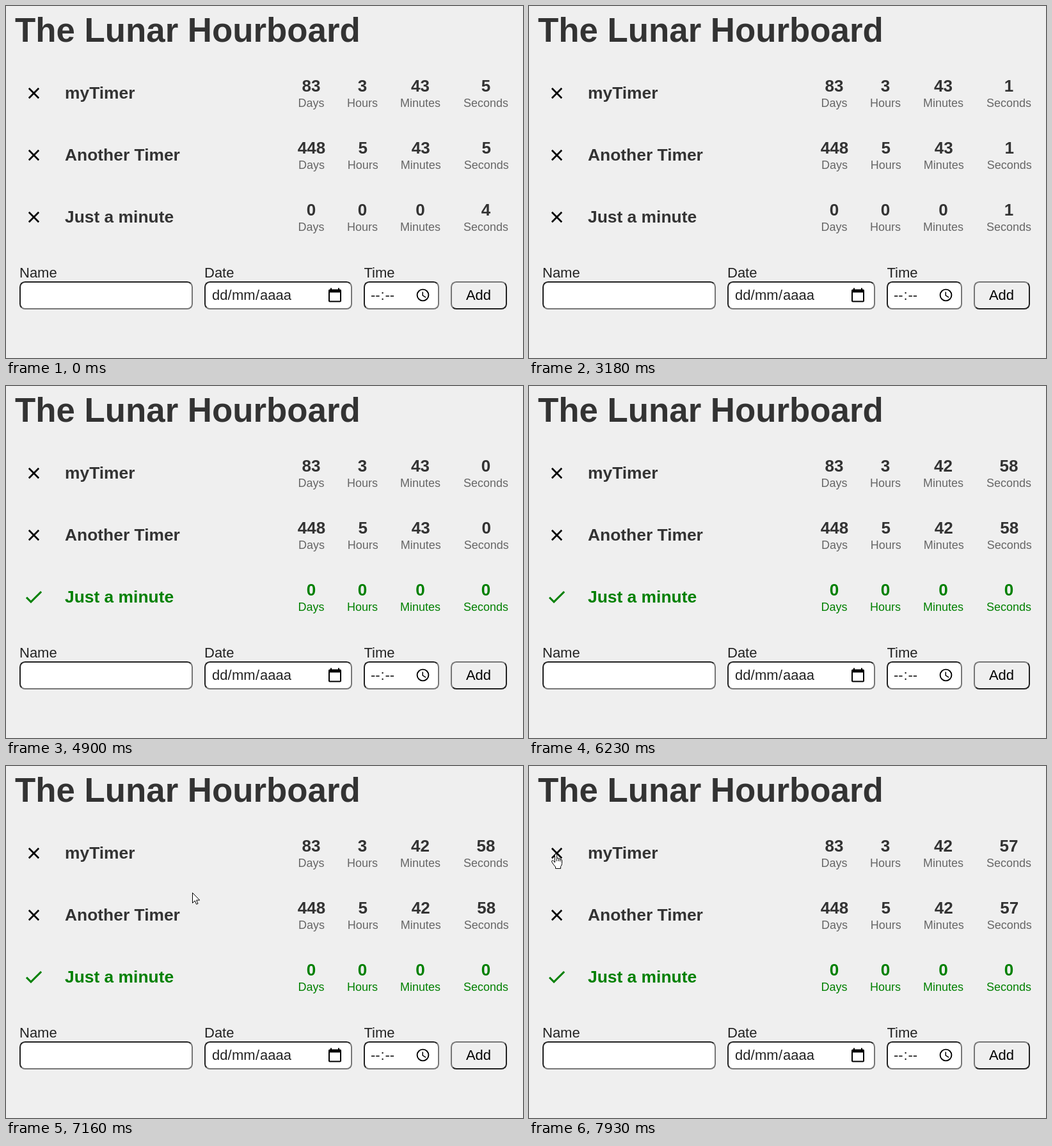
Write an HTML page with a canvas that moves like this. It is 808 px wide and 551 px high and loops after 8000 ms.

```html
<!DOCTYPE html>
<html lang="en">
<head>
<meta charset="utf-8">
<title>Timers</title>
<style>
  html, body { margin: 0; width: 100%; height: 100%; overflow: hidden; background: #efefef; }
  canvas { position: absolute; left: 0; top: 0; }
  .box {
    position: absolute; top: 431px; height: 44px; box-sizing: border-box;
    border: 2px inset #767676; border-radius: 8.8px; background: #fff;
  }
  .button { border-style: outset; background: #efefef; }
</style>
</head>
<body>
<div class="box" style="left:21px;width:271px"></div>
<div class="box" style="left:310px;width:231px"></div>
<div class="box" style="left:559px;width:118px"></div>
<div class="box button" style="left:695px;width:88px"></div>
<canvas id="stage" width="808" height="551"></canvas>
<script>
const ctx = document.getElementById('stage').getContext('2d');
const LOOP = 8000;
const DARK = '#333', INK = '#222', GRAY = '#666', GREEN = '#008000';
const FAMILY = '"Liberation Sans", Arial, sans-serif';

const LONG_TICKS = [210, 1150, 2160, 3180, 4190, 5220, 6230, 7240];
const SHORT_TICKS = [920, 1840, 2860, 3890];
const DONE_AT = 4900;

const POINTER_START = 6550, POINTER_STEP = 76.6;

const CALENDAR = new Path2D('M20 3h-1V1h-2v2H7V1H5v2H4c-1.1 0-2 .9-2 2v16c0 1.1.9 2 2 2h16c1.1 0 2-.9 2-2V5c0-1.1-.9-2-2-2zm0 18H4V8h16z');
const CLOCK_HANDS = new Path2D('M12.5 7H11v6l5.25 3.15.75-1.23-4.5-2.67z');
const CHECK = new Path2D('M9 16.17L4.83 12l-1.42 1.41L9 19 21 7l-1.41-1.41z');
const ARROW = new Path2D('M.5.5V16.5L4.2 12.9L6.6 18.4L9 17.4L6.6 12H11.7Z');
const HAND = new Path2D('M5.5 14V2.5Q5.5.5 7 .5T8.5 2.5V7.5Q10 6 11.5 8Q13 7 14 9Q16.5 8.5 16.5 11V15.5Q16.5 18 14.5 20.5V23.5H6.5V21Q4 18.5 .8 13.5Q0 11.5 1.5 10.8Q3 10.5 5.5 14Z');
const HAND_LINES = new Path2D('M8.5 7.5V12M11.5 8V12M14 9V12.5');

const countPassed = (ticks, t) => ticks.filter(tick => t >= tick).length;
const lerp = (a, b, u) => a + (b - a) * u;
const slowing = (u, c) => u * (1 + c * (1 - u));

function text(str, x, y, size, color = DARK, weight = 'normal', align = 'left') {
  ctx.font = `${weight} ${size}px ${FAMILY}`;
  ctx.textAlign = align;
  ctx.fillStyle = color;
  ctx.fillText(str, x, y);
}

function at(x, y, scale, draw) {
  ctx.save();
  ctx.translate(x, y);
  ctx.scale(scale, scale);
  draw();
  ctx.restore();
}

function cross(x, y) {
  const r = 7.7;
  ctx.strokeStyle = '#000';
  ctx.lineWidth = 2.7;
  ctx.beginPath();
  ctx.moveTo(x - r, y - r);
  ctx.lineTo(x + r, y + r);
  ctx.moveTo(x + r, y - r);
  ctx.lineTo(x - r, y + r);
  ctx.stroke();
}

function timer(top, name, values, centers, done) {
  if (done) {
    at(26.2, top + 13, 1.42, () => {
      ctx.fillStyle = ctx.strokeStyle = GREEN;
      ctx.lineWidth = 0.2;
      ctx.fill(CHECK);
      ctx.stroke(CHECK);
    });
  } else {
    cross(43.5, top + 30.5);
  }
  const color = done ? GREEN : DARK;
  text(name, 92, top + 39, 26.4, color, 'bold');
  ['Days', 'Hours', 'Minutes', 'Seconds'].forEach((unit, i) => {
    text(values[i], centers[i], top + 28, 26, color, 'bold', 'center');
    text(unit, centers[i], top + 52, 18, done ? GREEN : GRAY, 'normal', 'center');
  });
}

function form() {
  text('Name', 21, 425, 22, INK);
  text('Date', 310, 425, 22, INK);
  text('Time', 559.5, 425, 22, INK);
  [['dd', 322], ['/', 346.5], ['mm', 353], ['/', 390], ['aaaa', 397],
   ['--', 570], [':', 585.5], ['--', 592.5]].forEach(([s, x]) => text(s, x, 460, 22, INK));
  text('Add', 738.5, 460, 22, '#000', 'normal', 'center');

  ctx.fillStyle = ctx.strokeStyle = '#000';
  at(502, 440.5, 1, () => ctx.fill(CALENDAR, 'evenodd'));
  at(639.5, 440.5, 1, () => {
    ctx.lineWidth = 1.9;
    ctx.beginPath();
    ctx.arc(12, 12, 8.9, 0, Math.PI * 2);
    ctx.stroke();
    ctx.fill(CLOCK_HANDS);
  });
}

function pointerPosition(step) {
  if (step <= 8) {
    const u = step / 8;
    return [lerp(798, 291, slowing(u, 0.16)), lerp(442, 198, slowing(u, 0.45))];
  }
  if (step <= 10) {
    const u = (step - 8) / 2;
    return [lerp(291, 185, u), lerp(198, 167, u)];
  }
  const u = 1 - (1 - Math.min(1, (step - 10) / 8)) ** 3;
  return [lerp(185, 43, u), lerp(167, 137, u)];
}

function pointer(t) {
  if (t < POINTER_START) return;
  const step = Math.floor((t - POINTER_START) / POINTER_STEP + 0.05);
  const [x, y] = pointerPosition(step).map(Math.round);
  const overButton = x < 58;
  at(overButton ? x - 8 : x, y, 1, () => {
    const shape = overButton ? HAND : ARROW;
    ctx.fillStyle = '#fff';
    ctx.strokeStyle = '#000';
    ctx.lineWidth = 1;
    ctx.fill(shape);
    ctx.stroke(shape);
    if (overButton) ctx.stroke(HAND_LINES);
  });
}

function draw(t) {
  ctx.clearRect(0, 0, 808, 551);
  text('The Lunar Hourboard', 14, 56, 52.8, DARK, 'bold');

  const left = 43 * 60 + 5 - countPassed(LONG_TICKS, t);
  const minutes = Math.floor(left / 60), seconds = left % 60;
  const centers = [477, 557, 647.5, 750];
  timer(106, 'myTimer', [83, 3, minutes, seconds], centers);
  timer(203, 'Another Timer', [448, 5, minutes, seconds], [477.5, 557.7, 648.2, 750.8]);
  timer(300, 'Just a minute', [0, 0, 0, 4 - countPassed(SHORT_TICKS, t)], centers, t >= DONE_AT);

  form();
  pointer(t);
}

const start = performance.now();
function frame() {
  draw((performance.now() - start) % LOOP);
  requestAnimationFrame(frame);
}
frame();
</script>
</body>
</html>
```
